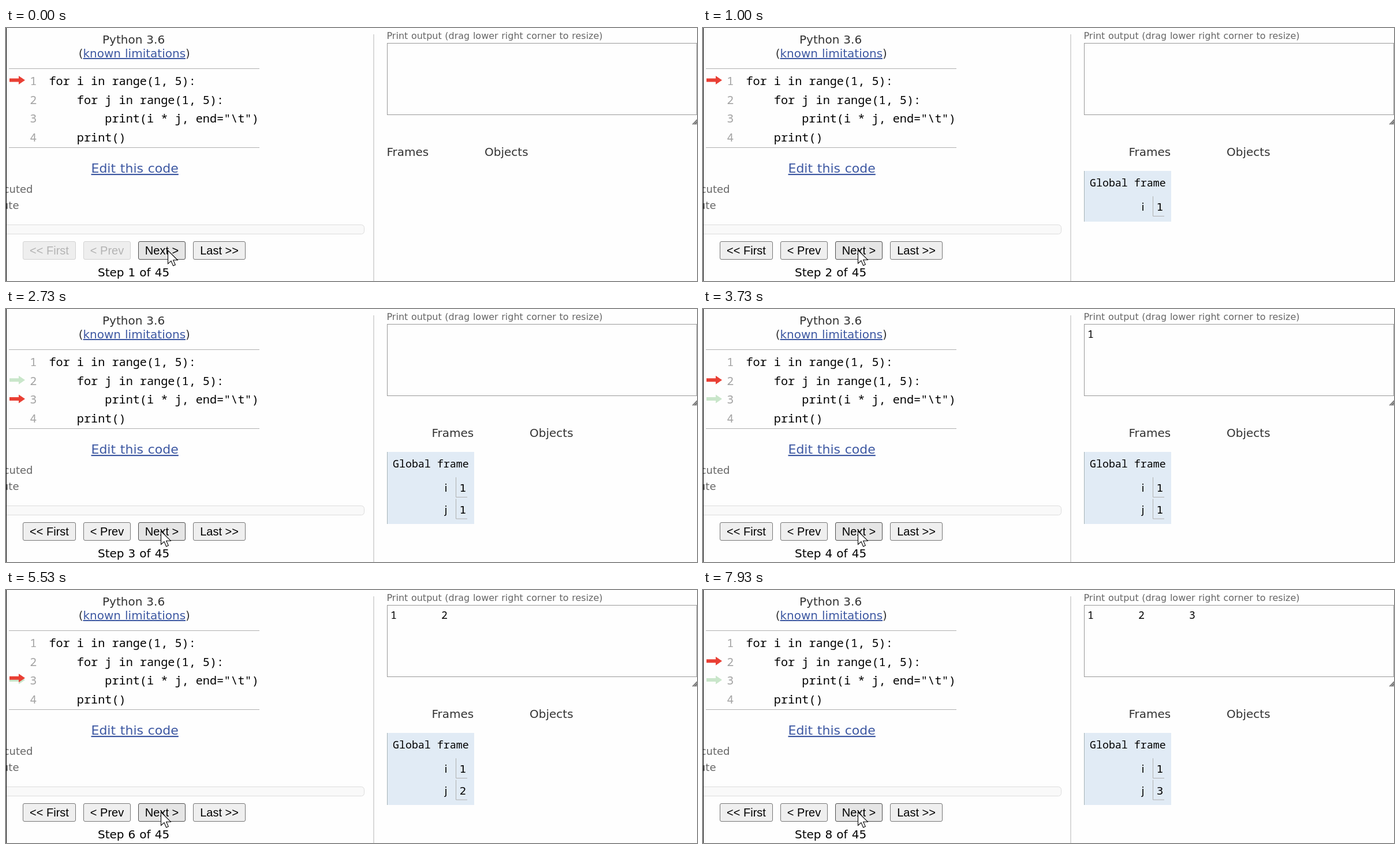
Recreate the animation shown at these times as an HTML page. Size 1197 by 439 pixels, loop 8000 ms.

```html
<!DOCTYPE html>
<html lang="en">
<head>
<meta charset="utf-8">
<title>Code stepper</title>
<style>
html, body { margin: 0; width: 100%; height: 100%; overflow: hidden; background: #fefefe; }
svg { display: block; }
text { white-space: pre; font: 20px "DejaVu Sans", sans-serif; word-spacing: .034em; fill: #333; }
.mono { font-family: "Noto Sans Mono", monospace; word-spacing: 0; fill: #000; }
.code { font-size: 20.2px; }
.num { fill: #a3a3a3; }
.small { font-size: 18.3px; fill: #000; }
.note { fill: #666; }
.link { fill: #3d58a2; text-decoration: underline; }
.btn { font-family: "Liberation Sans", sans-serif; word-spacing: 0; text-anchor: middle; }
.line { fill: none; stroke: #b0b0b0; }
</style>
</head>
<body>
<svg id="stage" width="1197" height="439" viewBox="0 0 1197 439">
  <rect width="1197" height="439" fill="#fefefe"/>
  <text x="167" y="27">Python 3.6</text>
  <text x="125.7" y="51">(<tspan class="link">known limitations</tspan>)</text>
  <path class="line" d="M5 70.5H439M5 207.5H439"/>
  <g id="code"></g>
  <text class="link" x="147.5" y="251" style="font-size:22px">Edit this code</text>
  <g text-anchor="end">
    <text class="note" x="46.5" y="286" style="font-size:18px">line that just executed</text>
    <text class="note" x="22.5" y="314" style="font-size:18px">next line to execute</text>
  </g>
  <rect x="-20" y="341.5" width="640.5" height="16" rx="5" fill="#f9f9f9" stroke="#dcdcdc"/>
  <rect width="1" height="439" fill="#000"/>
  <rect x="636" y="11" width="2" height="428" fill="#d9d9d9"/>
  <g id="buttons"></g>
  <text id="step" x="159" y="431" style="fill:#000"></text>

  <text class="note" x="659.5" y="19" style="font-size:16px">Print output (drag lower right corner to resize)</text>
  <rect x="660.5" y="26.5" width="536" height="124" fill="#fefefe" stroke="#999"/>
  <g id="out"></g>
  <path d="M1197 158V167.500H1188.500Z" fill="#999"/>
  <path d="M1189 167L1197 159M1193 167L1197 163" stroke="#555"/>
  <text id="frames" y="222">Frames</text>
  <text id="objects" y="222">Objects</text>
  <g id="globals">
    <rect id="panel" x="660" y="248" width="151" fill="#e1ebf5"/>
    <rect id="edge" x="660" y="248" width="1" fill="#a6b3b6"/>
    <text class="mono small" x="670" y="275">Global frame</text>
  </g>
  <path id="prev" d="M6-3H22V-7.500L33 0 22 7.500V3H6Z"/>
  <path id="cur" d="M6-3H22V-7.500L33 0 22 7.500V3H6Z" fill="#e93f34"/>
  <path id="mouse" d="M.5 .5V23.500L6 18.600 9.600 27 13.300 25.400 9.700 17.200H17.300Z" fill="#fff" stroke="#000" stroke-width="1.100"/>
</svg>
<script>
const LOOP = 8000, FPS = 15, LIGHT = [201, 230, 202];
const $ = id => document.getElementById(id);

function add(parent, tag, attrs, text = '') {
  const el = document.createElementNS('http://www.w3.org/2000/svg', tag);
  for (const k in attrs) el.setAttribute(k, attrs[k]);
  el.textContent = text;
  parent.appendChild(el);
  return el;
}
const set = (el, key, value) => el.setAttribute(key, value);
const show = (el, on) => set(el, 'visibility', on ? 'inherit' : 'hidden');
const clamp = v => Math.min(1, Math.max(0, v));
const ease = p => p < .5 ? 4 * p ** 3 : 1 - 4 * (1 - p) ** 3;
const mix = (a, b, p) => a + (b - a) * p;

['for i in range(1, 5):',
 '    for j in range(1, 5):',
 '        print(i * j, end="\\t")',
 '    print()'].forEach((src, i) => {
  const y = 99 + 32.6 * i;
  add($('code'), 'text', { class: 'mono code num', x: 41.3, y }, i + 1);
  add($('code'), 'text', { class: 'mono code', x: 74.4, y }, src);
});

const buttons = [['<< First', 29, 92], ['< Prev', 134, 82], ['Next >', 229, 82], ['Last >>', 324, 91]]
  .map(([label, x, w]) => ({
    box: add($('buttons'), 'rect', { x: x + .5, y: 370.5, width: w - 1, height: 31, rx: 2.5 }),
    text: add($('buttons'), 'text', { class: 'btn', x: x + w / 2, y: 393 }, label)
  }));
const looks = {
  normal: ['#efefef', '#767676', '#000'],
  off: ['#eeeeee', '#d2d2d2', '#b3b3b3'],
  hover: ['#e5e5e5', '#4f4f4f', '#000'],
  down: ['#f5f5f5', '#8d8d8d', '#000']
};
function paint(i, look) {
  const [fill, stroke, ink] = looks[look], b = buttons[i];
  set(b.box, 'fill', fill);
  set(b.box, 'stroke', stroke);
  b.text.style.fill = ink;
}

const vars = ['i', 'j'].map((name, k) => {
  const g = add($('globals'), 'g', { transform: `translate(0 ${37.5 * k})` });
  add(g, 'text', { class: 'small', x: 764.5, y: 317, 'text-anchor': 'end' }, name);
  add(g, 'path', { class: 'line', d: 'M779.5 292V326.5H799' });
  return { g, value: add(g, 'text', { class: 'small', x: 785.7, y: 317 }) };
});
const prints = [1, 2, 3].map((n, k) =>
  add($('out'), 'text', { class: 'mono small', x: 666 + 88 * k, y: 50 }, n));

// Times of each click: button down, new step shown, arrow motion begins.
const clicks = [
  [860, 1000, 970], [2200, 2260, 2265], [3200, 3260, 3265], [4200, 4260, 4205],
  [5130, 5330, 5262], [6260, 6460, 6405], [7400, 7460, 7465]
];
const lineOf = step => step < 2 ? 1 : 2 + step % 2;
const lineY = line => 90.6 + 32.65 * (line - 1);
const place = (el, x, y) => set(el, 'transform', `translate(${x} ${y})`);

function drawArrows(t) {
  const step = 1 + clicks.filter(c => c[2] <= t).length;
  const age = step > 1 ? t - clicks[step - 2][2] : 0;
  const moved = age >= 200;
  const p = ease(clamp((age - 200) / 250));
  place($('cur'), 0, mix(lineY(lineOf(step - 1)), lineY(lineOf(step)), p));
  show($('prev'), step > 2 || moved);
  place($('prev'), 0, lineY(lineOf(moved ? step - 1 : step - 2)));
  const fade = moved ? 0 : ease(clamp(age / 200));
  set($('prev'), 'fill', `rgb(${LIGHT.map(c => Math.round(mix(c, 254, fade)))})`);
}

function drawState(t) {
  const step = 1 + clicks.filter(c => c[1] <= t).length;
  const down = clicks.some(c => c[0] <= t && t < c[1]);
  const started = step > 1;
  $('step').textContent = `Step ${step} of 45`;
  paint(0, started ? 'normal' : 'off');
  paint(1, started ? 'normal' : 'off');
  paint(2, down ? 'down' : 'hover');
  paint(3, 'normal');

  set($('frames'), 'x', started ? 737.5 : 659.5);
  set($('objects'), 'x', started ? 907 : 829);
  show($('globals'), started);
  const height = step > 2 ? 125 : 88;
  set($('panel'), 'height', height);
  set($('edge'), 'height', height);
  show(vars[1].g, step > 2);
  vars[0].value.textContent = 1;
  vars[1].value.textContent = Math.floor((step - 1) / 2);
  prints.forEach((el, k) => show(el, k < Math.floor(step / 2) - 1));
}

function drawMouse(t) {
  const a = clamp(t / 133), b = clamp((t - 333) / 333);
  place($('mouse'), 280 - 5 * a - 7 * b, 385.6 - .6 * b);
}

function draw(ms) {
  const t = Math.floor(ms % LOOP * FPS / 1000 + .11) * 1000 / FPS % LOOP;
  drawState(t);
  drawArrows(t);
  drawMouse(t);
}

const begin = performance.now();
function tick() {
  draw(performance.now() - begin);
  requestAnimationFrame(tick);
}
tick();
</script>
</body>
</html>
```
